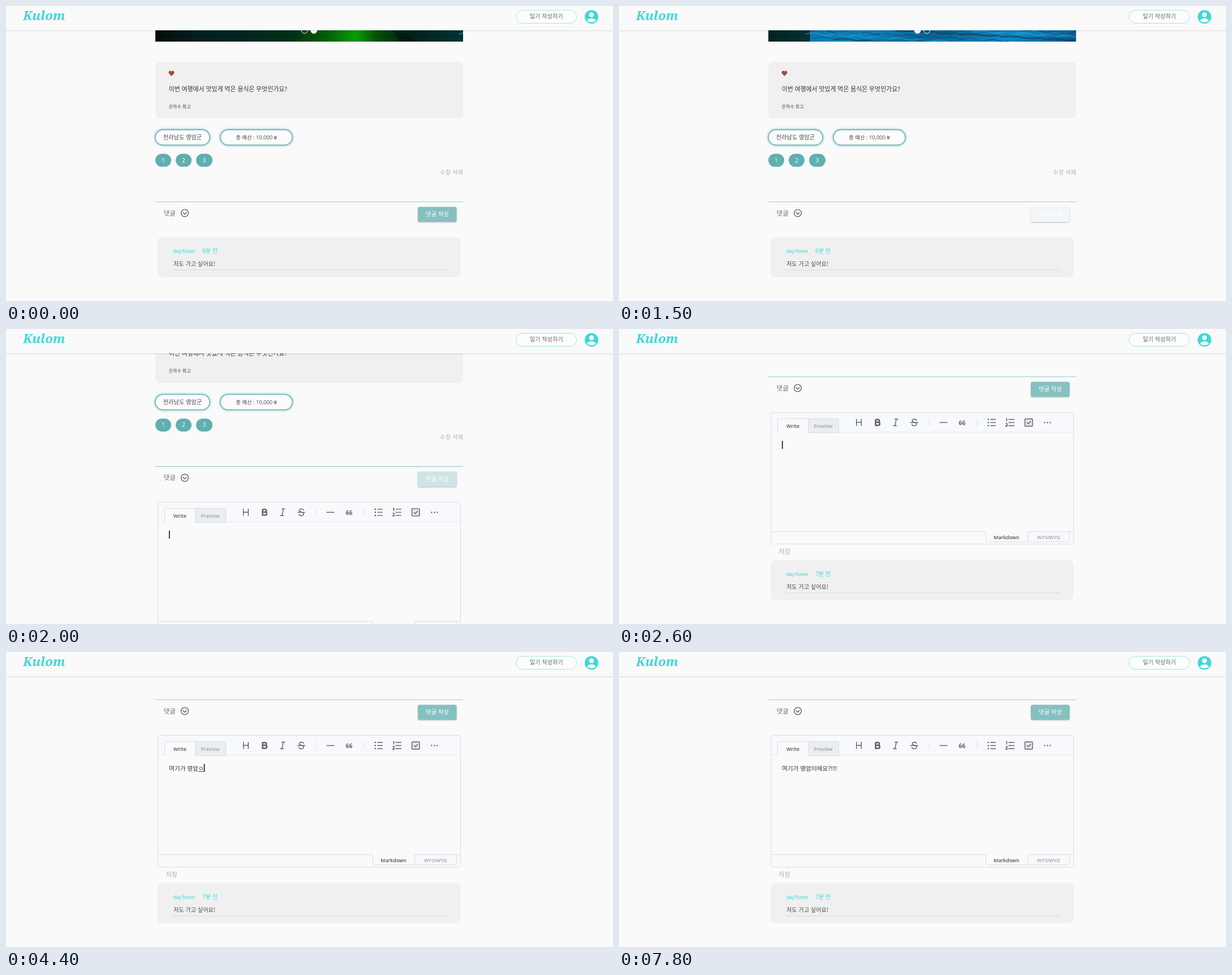
These frames come from a looping animation (1073x522 px, 8000 ms). An HTML page:

```html
<!DOCTYPE html>
<html lang="ko">
<head>
<meta charset="utf-8">
<title>Travel diary comment</title>
<style>
html, body { margin: 0; width: 100%; height: 100%; overflow: hidden; background: #fafafa; }
svg { display: block; }
text { font-family: "Open Sans", "Noto Sans CJK KR", "Noto Sans CJK JP", "Noto Sans CJK", sans-serif; font-size: 10.2px; fill: #4a4a4a; white-space: pre; }
.mid { text-anchor: middle; }
.tab { font-size: 8.8px; font-weight: 600; text-anchor: middle; fill: #505050; }
.off { fill: #9da1ab; }
.teal { fill: #3fd8d8; }
.icon { fill: none; stroke: #606060; stroke-width: 1.4; }
.glow { fill: #fbfdfd; stroke: #68aeb3; stroke-width: 1.4; filter: drop-shadow(0 0 2px #63b5ba); }
.lift { filter: drop-shadow(0 1px 1px #0004); }
</style>
</head>
<body>
<svg width="1073" height="522" viewBox="0 0 1073 522">
  <defs>
    <linearGradient id="aurora">
      <stop offset="0" stop-color="#020b0b"/><stop offset=".14" stop-color="#03201d"/>
      <stop offset=".3" stop-color="#02251f"/><stop offset=".45" stop-color="#033016"/>
      <stop offset=".57" stop-color="#056507"/><stop offset=".65" stop-color="#0a9d05"/>
      <stop offset=".72" stop-color="#045006"/><stop offset=".82" stop-color="#021f17"/>
      <stop offset="1" stop-color="#043234"/>
    </linearGradient>
    <linearGradient id="sea" x2="1" y2=".15">
      <stop offset="0" stop-color="#0d6fa8"/><stop offset=".25" stop-color="#0c82b8"/>
      <stop offset=".5" stop-color="#0a6190"/><stop offset=".75" stop-color="#1088c4"/>
      <stop offset="1" stop-color="#0a4f80"/>
    </linearGradient>
  </defs>

  <g id="page">
    <svg x="264" y="30" width="544" height="33">
      <g id="slides">
        <rect width="544" height="33" fill="url(#aurora)"/>
        <path d="M420 13L446 21L464 33H432Z" fill="#011512" opacity=".7"/>
        <rect x="544" width="544" height="33" fill="url(#sea)"/>
        <g id="waves" transform="translate(544)" fill="none"></g>
      </g>
    </svg>
    <g stroke="#fff">
      <circle id="dot1" cx="527.7" cy="43" r="5.5"/>
      <circle id="dot2" cx="544.2" cy="43" r="5.5"/>
    </g>

    <rect x="264" y="99" width="544" height="100" rx="8" fill="#f1f0f1"/>
    <path d="M292.5 123.5L288.6 119.4C286.4 116.8 290.2 112.8 292.5 116.6C294.8 112.8 298.6 116.8 296.4 119.4Z" fill="#b5443e" stroke="#75504f"/>
    <text x="287.7" y="150.5" style="font-size:10.9px;fill:#333">이번 여행에서 맛있게 먹은 음식은 무엇인가요?</text>
    <text x="287.7" y="180.5" style="font-size:8px">은하수 최고</text>

    <rect class="glow" x="264" y="219" width="96" height="27" rx="13.5"/>
    <text class="mid" x="312" y="236">전라남도 영암군</text>
    <rect class="glow" x="379" y="219" width="127" height="27" rx="13.5"/>
    <text class="mid" x="442.5" y="236" style="font-size:9.4px">총 예산 : 10,000 ₩</text>

    <g fill="#61afb0">
      <rect x="264" y="261.5" width="28" height="23" rx="11.5"/>
      <rect x="300" y="261.5" width="28" height="23" rx="11.5"/>
      <rect x="336" y="261.5" width="29" height="23" rx="11.5"/>
    </g>
    <text class="mid" y="276.5" style="fill:#fff"><tspan x="278">1</tspan><tspan x="314">2</tspan><tspan x="350.5">3</tspan></text>
    <text x="808" y="298" text-anchor="end" style="font-size:10.4px;fill:#b0b0b0">수정 삭제</text>

    <path d="M264 346.5H808" stroke="#93d2cb" stroke-width="1.2"/>
    <text x="278.5" y="370.5" style="font-size:11.6px;fill:#707070">댓글</text>
    <g class="icon" style="stroke-width:1.4">
      <circle cx="316" cy="366.5" r="6.4"/><path d="M312.7 365.2L316 368.5L319.3 365.2"/>
    </g>
    <rect id="button" class="lift" x="728" y="355.5" width="68.5" height="26.5" rx="3"/>
    <text class="mid" x="762.3" y="372" style="font-size:10.4px;fill:#fff">댓글 작성</text>

    <g id="editor">
      <rect x="268.5" y="409.5" width="535" height="233" rx="3" fill="#fafafa"/>
      <path d="M269 444.5V412Q269 410 271 410H801Q803 410 803 412V444.5Z" fill="#f7f9fc"/>
      <path d="M269 444.5H803" stroke="#e6ebf0"/>
      <rect x="268.5" y="409.5" width="535" height="233" rx="3" fill="none" stroke="#dadde6"/>
      <path d="M334.5 445.5V420.5H386Q388.5 420.5 388.5 423V445.5Z" fill="#eaedf1" stroke="#dadde6"/>
      <path d="M280.5 446V423Q280.5 420.5 283 420.5H334.5V446" fill="#fafafa" stroke="#dadde6"/>
      <text class="tab" x="307.5" y="437">Write</text>
      <text class="tab off" x="361" y="437">Preview</text>

      <g class="icon">
        <path d="M419.7 421V433.5M428.3 421V433.5M419.7 427.3H428.3"/>
        <path d="M453.5 422.2H457.5C461.3 422.2 461.3 427 457.5 427H453.5M453.5 427H458C462 427 462 432.5 458 432.5H453.5V422" stroke-width="2.4"/>
        <path d="M487 421.5H493.5M484.5 433.3H491M490.3 421.5L487.7 433.3"/>
        <path d="M526 424C525.3 420.5 518 420.8 518.3 424.5C518.5 427 524 426.8 525.5 428.6C527.3 432 524 433.5 522 433.4C519.5 433.4 518 432 517.8 430.3M515 427.5H529"/>
        <path d="M566.5 427.5H580.5"/>
        <path d="M656.5 422H666M656.5 427.5H666M656.5 433H666M688.5 422H699M688.5 427.5H699M688.5 433H699"/>
        <path d="M651.5 422H654M651.5 427.5H654M651.5 433H654" stroke-width="2.2"/>
        <path d="M684 421.5L685.5 420.5V425.5M683.7 429.7C685 428 687.5 429.8 686 431.5L683.8 434H687.3"/>
        <rect x="717.5" y="421" width="13.5" height="13" rx="1" fill="#e1e4ea"/>
        <path d="M721 427.3L723.5 429.8L728 425"/>
        <path d="M751 427.5H753.3M756 427.5H758.3M761 427.5H763.3" stroke-width="2"/>
      </g>
      <text class="mid" x="606.5" y="432" style="font-size:10.3px;font-weight:700;fill:#606060">66</text>
      <path d="M548.5 421V434M632.5 421V434" stroke="#e0e2e8"/>

      <text id="typed" x="288" y="471.5" xml:space="preserve" style="font-size:10.7px;fill:#333"></text>
      <rect id="underline" y="473" height="1" fill="#444"/>
      <rect id="caret" y="460" width="1.6" height="14" fill="#111"/>

      <path d="M269 620.5H648.5V636Q648.5 638.5 651 638.5H720Q722.5 638.5 722.5 636V620.5H803" fill="none" stroke="#dadde6"/>
      <path d="M722.5 620.5H796.5V636Q796.5 638.5 794 638.5H722.5Z" fill="#f7f9fc" stroke="#dadde6"/>
      <text class="tab" x="685" y="634">Markdown</text>
      <text class="tab off" x="759.3" y="634">WYSIWYG</text>
      <text x="282" y="660.3" style="font-size:11.4px;fill:#b0b0b0">저장</text>
    </g>

    <g id="comment">
      <rect x="268" y="409" width="535.5" height="71" rx="8" fill="#f0f0f0"/>
      <text class="teal" x="295.7" y="437" style="font-family:'Liberation Sans',sans-serif;font-size:9.3px">dayToren</text>
      <text id="age" class="teal" x="347" y="437"></text>
      <text x="296" y="459.5">저도 가고 싶어요!</text>
      <path d="M293 467H779" stroke="#d9d9d9"/>
    </g>
  </g>

  <rect width="1073" height="43" fill="#fafafa" style="filter:drop-shadow(0 1px 1px #0002)"/>
  <text class="teal" x="30" y="25" style="font:italic bold 22.4px 'Noto Serif',serif">Kulom</text>
  <rect x="901.5" y="7.5" width="107" height="23" rx="11.5" fill="#fcfdfd" stroke="#a6e6e4"/>
  <text class="mid" x="955.3" y="22.3" style="fill:#666">일기 작성하기</text>
  <circle class="teal" cx="1035" cy="19.3" r="12"/>
  <circle cx="1035" cy="15.5" r="4.2" fill="#fff"/>
  <path d="M1027.3 26C1029 20.5 1041 20.5 1042.7 26C1039 29.5 1031 29.5 1027.3 26Z" fill="#fff"/>
</svg>

<script>
const LOOP = 8000, STEP = 100, OPEN = 1600, SCROLL = 262, TEXT_X = 288;
const el = id => document.getElementById(id);
const clamp = v => Math.min(1, Math.max(0, v));
const ramp = (t, from, to) => clamp((t - from) / (to - from));
const smooth = p => p * p * (3 - 2 * p);

// CSS "ease" timing: solve cubic-bezier(.25, .1, .25, 1) for x.
function ease(x) {
  const bezier = (u, a, b) => 3 * u * (1 - u) ** 2 * a + 3 * u * u * (1 - u) * b + u ** 3;
  let low = 0, high = 1;
  for (let i = 0; i < 24; i++) {
    const u = (low + high) / 2;
    bezier(u, .25, .25) < x ? low = u : high = u;
  }
  return bezier(low, .1, 1);
}

// Each burst types one state per step; Korean syllables are composed jamo by jamo.
const bursts = [
  [2700, "", "ㅇ|여|역|여기|여긱|여기가|여기가 "],
  [3500, "여기가 ", "ㅇ|여|영|영ㅇ|영아|영암"],
  [4400, "여기가 영암", "ㅇ|이|잉|이에"],
  [4900, "여기가 영암이", "엥|에요"],
  [5500, "여기가 영암이에요", "?"],
  [5800, "여기가 영암이에요?", "!"],
  [6000, "여기가 영암이에요?", "!!|!!!"],
  [6300, "여기가 영암이에요?", "!!!!"]
];
const keys = [{ at: OPEN, text: "" }];
for (const [start, head, states] of bursts)
  states.split("|").forEach((s, i) => keys.push({ at: start + i * STEP, text: head + s }));

let waves = "";
for (let i = 0; i < 46; i++) {
  const x = i * 12.3 - 20, y = 12 + (i * 7.7) % 21, w = 30 + (i * 17) % 50;
  const color = ["#043f66", "#25a6da", "#06304d"][i % 3];
  waves += `<path d="M${x} ${y}q${w / 4} -4 ${w / 2} 0t${w / 2} 1" stroke="${color}" stroke-width="${1 + i % 2}" opacity=".55"/>`;
}
el("waves").innerHTML = waves;

function drawTyping(t) {
  const key = keys.findLast(k => k.at <= t) || keys[0];
  const typed = el("typed");
  typed.textContent = key.text;
  const width = key.text ? typed.getComputedTextLength() : 0;
  const composing = /[ㄱ-ㅎ가-힣]$/.test(key.text);
  const last = composing ? typed.getSubStringLength(key.text.length - 1, 1) : 0;
  el("underline").setAttribute("x", TEXT_X + width - last);
  el("underline").setAttribute("width", last);
  el("caret").setAttribute("x", TEXT_X + width);
  el("caret").style.display = (t - key.at) % 1000 < 500 ? "" : "none";
}

function draw(t) {
  const open = t >= OPEN, swapped = t >= 1200;
  const hover = ramp(t, 1000, 1300) - ramp(t, 1900, 2200);
  const mix = (a, b) => a + (b - a) * hover;

  el("page").setAttribute("transform", `translate(0 ${-SCROLL * smooth(ramp(t, 1850, 2200))})`);
  el("slides").setAttribute("transform", `translate(${-544 * ease(ramp(t, 1215, 1715))})`);
  el("dot1").setAttribute("fill", swapped ? "#fff" : "none");
  el("dot2").setAttribute("fill", swapped ? "none" : "#fff");
  el("button").setAttribute("fill", `rgb(${mix(134, 242)},${mix(192, 246)},${mix(193, 249)})`);
  el("comment").setAttribute("transform", `translate(0 ${open ? SCROLL : 0})`);
  el("age").textContent = open ? "7분 전" : "6분 전";
  el("editor").style.display = open ? "" : "none";
  if (open) drawTyping(t);
}

const begin = performance.now();
function tick() {
  const t = (performance.now() - begin) % LOOP;
  draw(Math.floor(t / STEP) * STEP);
  requestAnimationFrame(tick);
}
tick();
</script>
</body>
</html>
```
